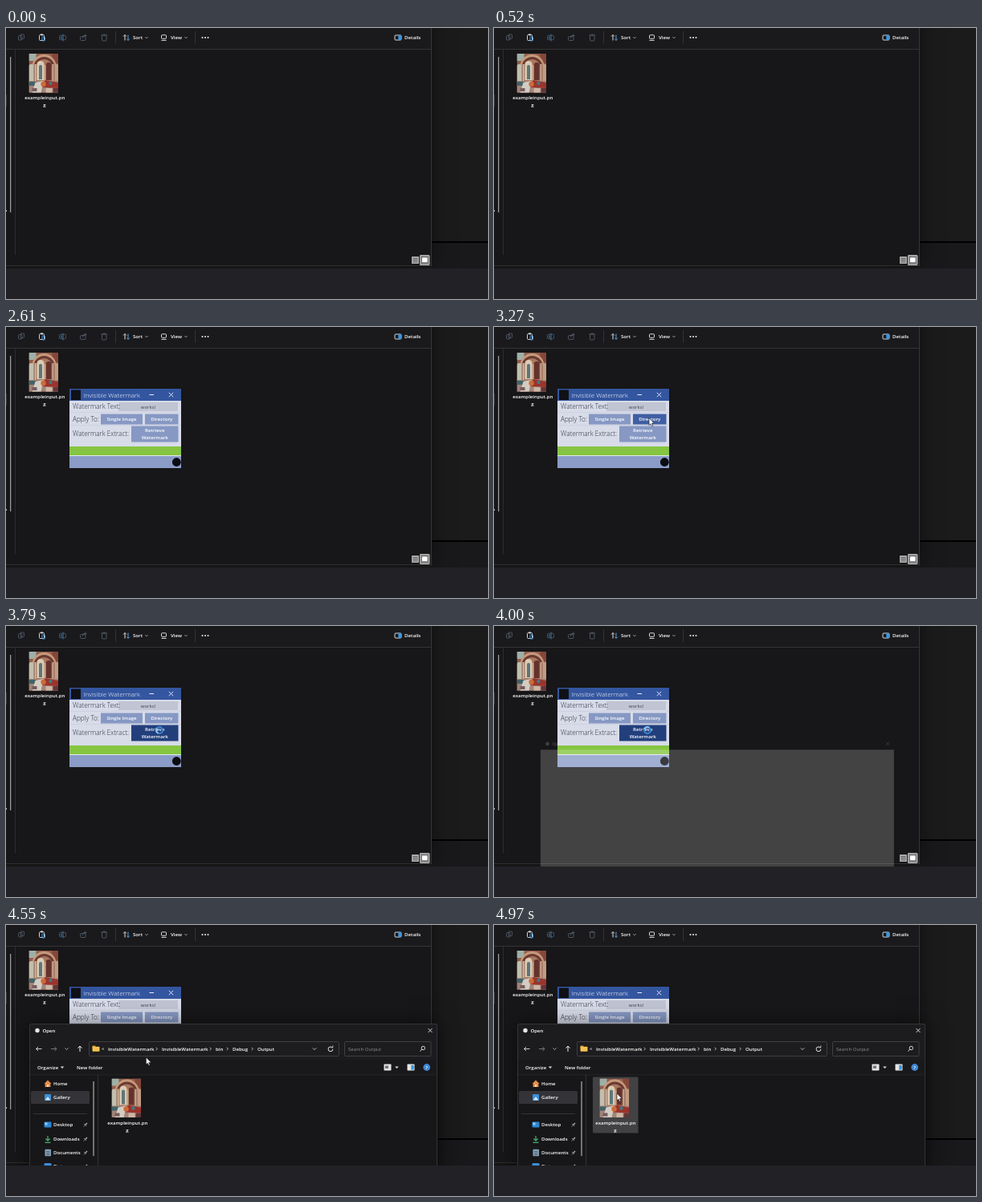
These frames come from a looping animation (600 by 338 pixels, 5000 ms). An HTML page with a canvas:

```html
<!DOCTYPE html>
<html lang="en">
<head>
<meta charset="utf-8">
<title>File dialog demo</title>
<style>
html, body { margin: 0; width: 100%; height: 100%; overflow: hidden; background: #171618; }
canvas { display: block; width: 100%; height: 100%; }
</style>
</head>
<body>
<canvas id="stage" width="600" height="338"></canvas>
<script>
const ctx = document.getElementById('stage').getContext('2d');
const LOOP = 5000;
const FONT = '"Open Sans", "Noto Sans", sans-serif';
const clamp = v => Math.max(0, Math.min(1, v));
const ease = v => v * v * (3 - 2 * v);

function rect(x, y, w, h, color) {
  ctx.fillStyle = color;
  ctx.fillRect(x, y, w, h);
}
function shadowRect(x, y, w, h, color, blur) {
  ctx.save();
  ctx.shadowColor = 'rgba(0, 0, 0, 0.5)';
  ctx.shadowBlur = blur;
  rect(x, y, w, h, color);
  ctx.restore();
}
function box(x, y, w, h, color, r = 0, width = 1) {
  ctx.strokeStyle = color;
  ctx.lineWidth = width;
  ctx.beginPath();
  ctx.roundRect(x, y, w, h, r);
  ctx.stroke();
}
function panel(x, y, w, h, color, r) {
  ctx.fillStyle = color;
  ctx.beginPath();
  ctx.roundRect(x, y, w, h, r);
  ctx.fill();
}
function disc(x, y, r, color) {
  ctx.fillStyle = color;
  ctx.beginPath();
  ctx.arc(x, y, r, 0, 7);
  ctx.fill();
}
function arc(x, y, r, from, to, color, width) {
  ctx.strokeStyle = color;
  ctx.lineWidth = width;
  ctx.beginPath();
  ctx.arc(x, y, r, from, to);
  ctx.stroke();
}
function trace(points) {
  ctx.beginPath();
  for (let i = 0; i < points.length; i += 2) ctx.lineTo(points[i], points[i + 1]);
}
function line(color, width, ...points) {
  ctx.strokeStyle = color;
  ctx.lineWidth = width;
  trace(points);
  ctx.stroke();
}
function poly(color, ...points) {
  ctx.fillStyle = color;
  trace(points);
  ctx.fill();
}
function text(str, x, y, { color = '#fff', size = 6.1, weight = 600, align = 'left' } = {}) {
  ctx.font = `${weight} ${size}px ${FONT}`;
  ctx.textAlign = align;
  ctx.textBaseline = 'alphabetic';
  ctx.fillStyle = color;
  ctx.fillText(str, x, y + size * 0.36);
}
const chevronDown = (x, y, c = '#aaa', r = 1.7) => line(c, 0.9, x - r, y - r / 2, x, y + r / 2, x + r, y - r / 2);
const chevronRight = (x, y) => line('#ccc', 0.9, x - 0.8, y - 1.7, x + 0.9, y, x - 0.8, y + 1.7);
const triangle = (x, y) => poly('#ddd', x - 2.3, y - 1.1, x + 2.3, y - 1.1, x, y + 1.4);
const cross = (x, y, r, c) => {
  line(c, 0.9, x - r, y - r, x + r, y + r);
  line(c, 0.9, x + r, y - r, x - r, y + r);
};
function arrow(x, y, dx, dy, color) {
  line(color, 1, x - 3.5 * dx, y - 3.5 * dy, x + 3.5 * dx, y + 3.5 * dy);
  const tx = x + 3.5 * dx, ty = y + 3.5 * dy;
  line(color, 1, tx - 2.6 * (dx + dy), ty - 2.6 * (dy + dx), tx, ty, tx - 2.6 * (dx - dy), ty - 2.6 * (dy - dx));
}

// Picture thumbnail: an arched hall in flat tones
function arch(x, y, w, h, color) {
  panel(x, y, w, h, color, [w / 2, w / 2, 0, 0]);
}
function thumb(x, y) {
  ctx.save();
  ctx.translate(x, y);
  ctx.beginPath();
  ctx.rect(0, 0, 36.5, 48.5);
  ctx.clip();
  rect(0, 0, 37, 49, '#935f4c');
  rect(0, 0, 9, 9, '#9db0a8');
  rect(29, 0, 8, 12, '#84473a');
  arch(4, 1, 30, 40, '#c79a7c');
  arch(6, 4, 26, 36, '#6b3a32');
  arch(9, 7, 20, 32, '#a9785f');
  arch(10, 9, 9, 24, '#dccbb4');
  arch(21, 11, 7, 22, '#64322c');
  arch(12.5, 14, 4, 18, '#5d7779');
  arch(0, 13, 6, 22, '#c2bfae');
  arch(32, 13, 5, 23, '#c29b82');
  rect(7, 13, 2, 23, '#d3bfa8');
  rect(19, 14, 2, 20, '#caa68e');
  rect(29, 13, 2, 22, '#cfae98');
  rect(0, 34, 37, 15, '#a18478');
  rect(0, 35, 9, 5, '#43636a');
  poly('#d3ccc2', 8, 36, 18, 34, 15, 49, 4, 49);
  poly('#9c332c', 20, 33, 37, 36, 37, 43, 17, 42);
  disc(18, 38, 3.2, '#c96c3a');
  disc(27, 37, 2.2, '#437880');
  rect(21, 43, 8, 6, '#cdb6a5');
  rect(30, 43, 7, 6, '#633638');
  rect(4, 43, 6, 4, '#755b60');
  ctx.restore();
}
function file(x, y) {
  thumb(x - 19.5, y);
  text('exampleinput.pn', x + 0.3, y + 55, { align: 'center' });
  text('g', x, y + 64, { align: 'center' });
}

function toolbar() {
  const dim = '#4c5560';
  box(15.5, 9.5, 4.5, 5.5, dim, 1);
  box(18, 8, 4.5, 5.5, dim, 1);
  box(41.5, 8.5, 6, 7, '#d4d4d4', 1);
  rect(43, 7.4, 3, 2, '#d4d4d4');
  box(45, 11, 3.5, 5, '#4b98d4', 0.6);
  box(66.5, 9.3, 8, 5.4, '#3d5870', 1);
  line('#3f6c92', 1, 71, 7.5, 71, 16.5);
  text('A', 67.6, 12, { color: '#4c7898', size: 4.5 });
  box(92.5, 10.5, 6.5, 5, dim, 1);
  line(dim, 1, 95, 13, 96.5, 9.5, 100, 9.5);
  line(dim, 1, 98, 7.5, 100, 9.5, 98, 11.5);
  line(dim, 1, 118.3, 9, 126.2, 9);
  box(119.5, 9, 5.5, 7, dim, 1);
  line(dim, 1, 121, 8, 123.5, 8);
  rect(136, 4, 1, 16, '#333236');
  line('#ddd', 1, 148, 15.5, 148, 8.5);
  line('#ddd', 0.9, 146, 10.5, 148, 8.5, 150, 10.5);
  line('#57a0d8', 1, 152, 8.5, 152, 15.5);
  line('#57a0d8', 0.9, 150, 13.5, 152, 15.5, 154, 13.5);
  text('Sort', 158, 12);
  chevronDown(175, 12);
  box(193.5, 8.8, 6, 4.5, '#ddd', 0.8);
  line('#ddd', 1, 193.5, 15.4, 199.5, 15.4);
  text('View', 205, 12);
  chevronDown(224, 12);
  rect(235, 4, 1, 16, '#333236');
  for (const x of [244.5, 248, 251.5]) disc(x, 12, 1, '#eee');
  box(484, 9, 8, 6, '#d8d8d8', 1);
  panel(488.3, 9, 3.7, 6, '#3d94dc', 0.5);
  text('Details', 496, 12);
}

function explorer() {
  rect(0, 0, 600, 338, '#1c1b1b');
  rect(530, 266, 70, 2, '#000');
  rect(530, 268, 70, 32, '#19181a');
  shadowRect(-40, -40, 569, 337, '#171618', 24);
  rect(0, 0, 529, 26, '#1a191c');
  rect(0, 26, 529, 1, '#343337');
  rect(11, 27, 1, 256, '#2c2b2f');
  rect(529, 0, 1, 297, '#363539');
  rect(0, 296, 530, 1, '#302f33');
  rect(5, 36, 1.3, 194, '#9a9a9a');
  rect(0, 83, 1, 15, '#39383a');
  rect(0, 227, 1, 2, '#bbb');
  toolbar();
  file(48, 32);
  panel(505, 285, 9, 9, '#aaa', 0.5);
  for (const y of [287, 289.2, 291.4]) rect(506.5, y, 6, 0.8, '#4c4c4c');
  panel(515.5, 283.5, 11.5, 12, '#858585', 0.5);
  box(515.5, 283.5, 11.5, 12, '#bbb', 0.5);
  panel(518, 286.5, 6.5, 5.5, '#fff', 1);
}

function button(label, x, y, w, h, color) {
  rect(x, y, w, h, color);
  const lines = label.split('\n');
  lines.forEach((s, i) =>
    text(s, x + w / 2, y + h / 2 + (i - (lines.length - 1) / 2) * 8.4, { align: 'center', color: '#fff' }));
}
function appWindow(hot, busy) {
  const idle = '#8698c3';
  const label = { size: 8.2, weight: 300, color: '#262a3a' };
  rect(79, 77, 139, 99, '#d8dce9');
  rect(79, 77, 139, 15, '#3456a0');
  rect(81, 78.5, 12, 12.5, '#101116');
  text('Invisible Watermark', 96.5, 85, { size: 8, weight: 300, color: '#fff' });
  line('#eef', 1, 178.5, 84.5, 184, 84.5);
  cross(205.5, 84.5, 2.7, '#eef');
  rect(79, 106, 139, 1, '#cdd2e2');
  rect(79, 122, 139, 1, '#cdd2e2');
  rect(140, 94, 74, 11, '#c1c5d3');
  text('Watermark Text:', 83, 99.5, label);
  text('works!', 177, 99.5, { align: 'center', weight: 400, color: '#3e4352' });
  text('Apply To:', 83, 115, label);
  button('Single Image', 118, 108.5, 52, 13, idle);
  button('Directory', 173, 108.5, 41.5, 13, hot === 'directory' ? '#405fa2' : idle);
  text('Watermark Extract:', 83, 133.5, label);
  button('Retrieve\nWatermark', 156, 123.5, 58.5, 20, hot === 'retrieve' ? (busy ? '#223f7c' : '#405fa2') : idle);
  rect(79, 149, 139, 11, '#85c541');
  rect(79, 160, 139, 1, '#e6eaf3');
  rect(79, 161, 139, 15, '#8a9cc7');
  disc(212.3, 168.5, 5.4, '#0b0c10');
}

function sideItem(label, y, pinned) {
  text(label, 59, y);
  if (!pinned) return;
  line('#aaa', 1.5, 98.5, y + 0.5, 101, y - 2);
  line('#aaa', 0.8, 97, y - 1, 100, y + 2);
  line('#aaa', 0.7, 98.5, y + 0.5, 96.5, y + 2.6);
}
function sidebar() {
  rect(114, 187, 1, 120, '#333236');
  rect(108.3, 195, 1.4, 93, '#9a9a9a');
  panel(31, 207, 73, 16, '#343337', 1.5);
  rect(34, 235, 67, 1, '#333236');
  sideItem('Home', 198);
  poly('#e88f48', 47.5, 198, 52, 193.5, 56.5, 198, 55.4, 198, 55.4, 202, 48.6, 202, 48.6, 198);
  rect(51, 199, 2, 3, '#f5dcc0');
  sideItem('Gallery', 215);
  panel(48, 211, 8, 8, '#3b8fd8', 1.2);
  poly('#cbe6fb', 48.5, 218.5, 52, 214, 55.5, 218.5);
  sideItem('Desktop', 249, true);
  panel(47.5, 245.5, 9, 7, '#2c86d4', 1);
  rect(48.5, 246.5, 3, 3, '#8fd0fa');
  sideItem('Downloads', 267, true);
  line('#4cb873', 1.2, 52, 263, 52, 269);
  line('#4cb873', 1.2, 49.3, 266.5, 52, 269, 54.7, 266.5);
  line('#4cb873', 1.2, 48.5, 271.3, 55.5, 271.3);
  sideItem('Documents', 284, true);
  panel(48.5, 279.8, 7.5, 8.5, '#8aa3b8', 0.8);
  for (const y of [282, 284, 286]) rect(50, y, 4.5, 0.8, '#35506a');
  sideItem('Pictures', 301, true);
  panel(47.5, 297, 9, 8, '#3b8fd8', 1);
}
function dialogContent(over) {
  rect(29, 140, 508, 28, '#1c1b1e');
  rect(29, 168, 508, 19, '#19181b');
  rect(29, 186.5, 508, 0.8, '#29282b');
  arrow(41, 154.5, -1, 0, '#ccc');
  arrow(59.5, 154.5, 1, 0, '#777');
  chevronDown(75.5, 154.5, '#bbb', 2);
  arrow(92, 154.5, 0, -1, '#eee');
  panel(103, 145.5, 312, 18, '#1d1c1f', 1);
  box(103.5, 145.5, 311, 18, '#3f3e42', 1);
  panel(107.5, 150.5, 4, 3, '#d99b35', 0.6);
  panel(107.5, 151.8, 9, 6, '#f2c14f', 0.8);
  text('«', 119, 154, { color: '#ccc' });
  const crumbs = [['InvisibleWatermark', 127], ['InvisibleWatermark', 194], ['bin', 261], ['Debug', 282], ['Output', 313]];
  for (const [name, x] of crumbs) {
    text(name, x, 154.5);
    if (x > 127) chevronRight(x - 6.5, 154.5);
  }
  chevronDown(384, 154.5, '#ccc', 2.2);
  arc(404, 154.8, 2.9, 0, 5.3, '#ddd', 1);
  line('#ddd', 0.9, 404.4, 152.8, 406.8, 152.8, 406.8, 150.5);
  box(421.5, 145.5, 107.5, 18, '#3f3e42', 1);
  text('Search Output', 426, 154.5, { color: '#8f8f92', weight: 400 });
  arc(519.3, 153.5, 2.2, 0, 7, '#ddd', 1);
  line('#ddd', 1, 517.7, 155.1, 515.5, 157.5);

  text('Organize', 39, 177.5);
  triangle(70, 177.5);
  text('New folder', 88, 177.5);
  panel(470.5, 173.5, 9, 8, '#e4e4e4', 0.8);
  rect(472, 175.5, 4, 3.5, '#777');
  triangle(486.5, 177.5);
  panel(499.5, 173.5, 9, 8, '#e4e4e4', 0.8);
  rect(504.3, 174.8, 3.4, 5.8, '#3b94dc');
  disc(523.7, 177.5, 4.4, '#3f86d2');
  text('?', 523.7, 177.4, { align: 'center', size: 6 });

  sidebar();
  if (over) panel(123, 189.5, 56.5, 70, '#424144', 1);
  file(151, 191.5);
}
// Opens by growing and fading in; the body is blank until it has loaded
function dialog(t, over) {
  const p = clamp((t - 3960) / 160);
  if (!p) return;
  const scale = 0.82 + 0.18 * p;
  const loaded = p > 0.7;
  ctx.save();
  ctx.translate(245 * (1 - scale), 247 * (1 - scale));
  ctx.scale(scale, scale);
  ctx.globalAlpha = p;
  if (loaded) {
    shadowRect(29, 123, 508, 248, '#171618', 24);
    rect(29, 123, 508, 17, '#1c1b1e');
    dialogContent(over);
    box(29.5, 123.5, 507, 248, '#343337', 2);
  } else {
    ctx.globalAlpha = p * 0.75;
    rect(29, 140, 508, 231, '#fff');
  }
  disc(39, 131.5, 2.7, '#e8e8e8');
  text('Open', 45.5, 131.5);
  cross(528, 131.5, 2.5, '#e4e4e4');
  ctx.restore();
}

// time, x, y of the pointer tip
const path = [
  [2640, 184, 304], [2910, 190, 170], [3120, 193, 113.5], [3300, 193, 113.5],
  [3480, 191, 130], [4340, 191, 130], [4800, 153, 210], [5000, 153, 210]
];
function pointerAt(t) {
  const i = path.findIndex(k => k[0] > t);
  if (i < 1) return null;
  const [t0, x0, y0] = path[i - 1], [t1, x1, y1] = path[i];
  const raw = (t - t0) / (t1 - t0);
  const k = i === 1 ? raw : ease(raw);
  return { x: x0 + (x1 - x0) * k, y: y0 + (y1 - y0) * k };
}
function pointer({ x, y }, busy, t) {
  if (busy) {
    arc(x, y, 4, 0, 7, '#3f86cf', 2);
    arc(x, y, 4, t / 140, t / 140 + 1.8, '#8cc6f4', 2);
    return;
  }
  ctx.save();
  ctx.translate(x, y);
  poly('#fff', 0, 0, 0, 9, 2, 7.2, 3.4, 10.2, 4.8, 9.6, 3.5, 6.6, 6.3, 6.5);
  ctx.closePath();
  ctx.lineWidth = 0.6;
  ctx.strokeStyle = '#111';
  ctx.stroke();
  ctx.restore();
}

function draw(t) {
  const pos = pointerAt(t);
  const inside = (x, y, w, h) => !!pos && pos.x >= x && pos.x <= x + w && pos.y >= y && pos.y <= y + h;
  const busy = t >= 3700 && t < 4120;
  let hot = '';
  if (t < 4120) {
    if (inside(173, 108, 42, 14)) hot = 'directory';
    else if (inside(156, 123, 59, 21)) hot = 'retrieve';
  }
  explorer();
  if (t >= 1150) appWindow(hot, busy);
  dialog(t, inside(123, 189, 57, 71));
  if (pos) pointer(pos, busy, t);
  rect(0, 300, 600, 38, '#222126');
}

const start = performance.now();
function tick() {
  draw((performance.now() - start) % LOOP);
  requestAnimationFrame(tick);
}
tick();
</script>
</body>
</html>
```
